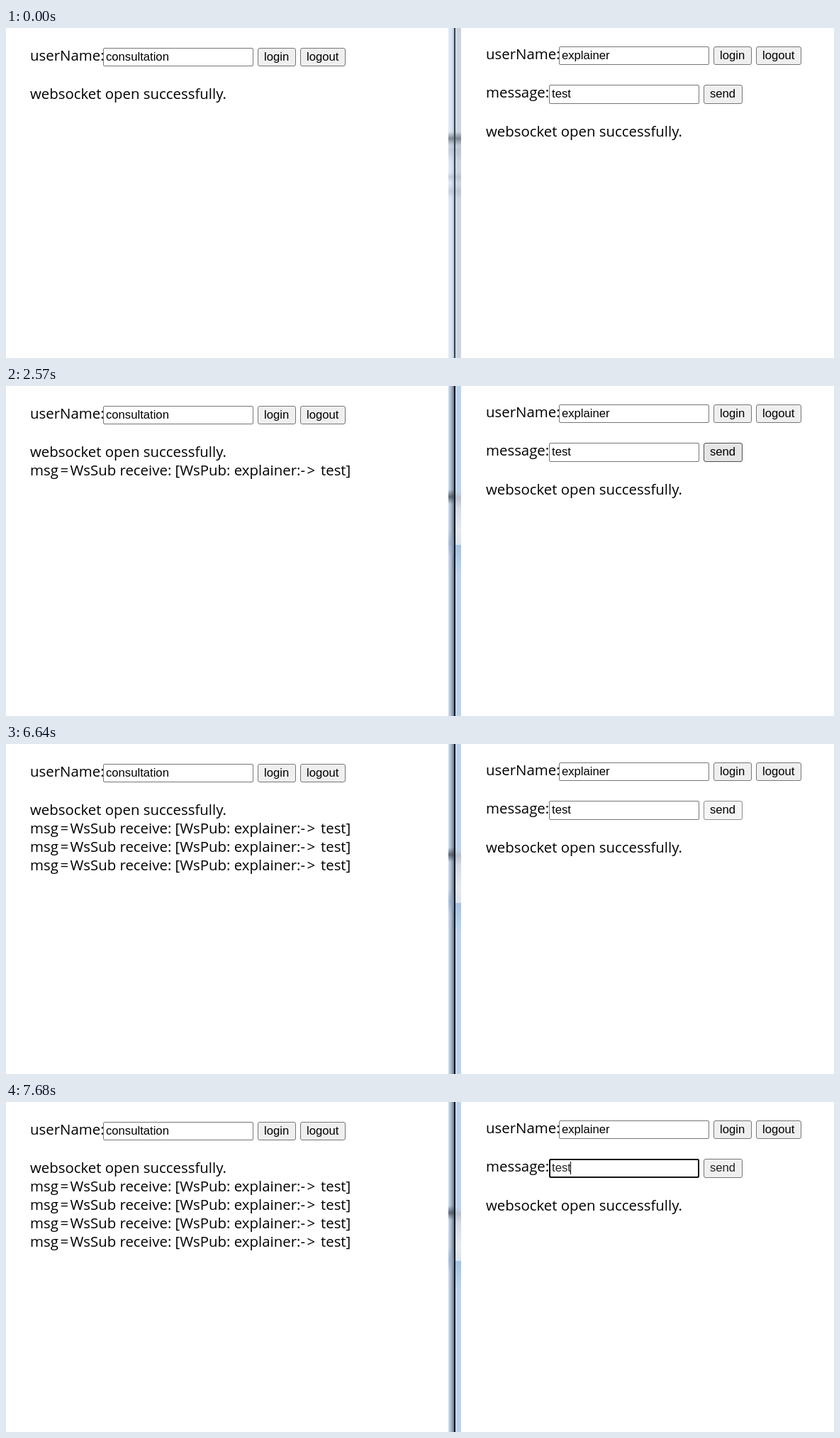
Recreate the animation shown at these times as an HTML page. Size 1168x465 px, loop 8 s.

```html
<!DOCTYPE html>
<html lang="en">
<head>
<meta charset="utf-8">
<title>Websocket demo</title>
<style>
  html, body { margin: 0; width: 100%; height: 100%; overflow: hidden; background: #fff; }
  svg { display: block; width: 1168px; height: 465px; }
  .label { font: 20.4px "Open Sans", "Noto Sans", sans-serif; white-space: pre; }
  .control { font: 16.67px "Liberation Sans", Arial, sans-serif; }
</style>
</head>
<body>
<svg id="stage" viewBox="0 0 1168 465" xmlns="http://www.w3.org/2000/svg"><defs id="defs"></defs></svg>
<script>
const LOOP = 8000;
const stage = document.getElementById('stage');
const defs = document.getElementById('defs');

const NORMAL = { fill: '#efefef', stroke: '#767676' };
const HOVER = { fill: '#e5e5e5', stroke: '#4f4f4f' };
const PRESSED = { fill: '#f5f5f5', stroke: '#8d8d8d' };
const HIDE = { opacity: 0 };
const SHOW = { opacity: 1 };

function add(tag, attrs, parent = stage) {
  const el = document.createElementNS('http://www.w3.org/2000/svg', tag);
  for (const key in attrs) el.setAttribute(key, attrs[key]);
  return parent.appendChild(el);
}

function text(cls, x, y, str, attrs = {}) {
  const el = add('text', { class: cls, x, y, ...attrs });
  el.textContent = str;
  return el;
}

const label = (x, y, str, attrs) => text('label', x, y, str, attrs);

function box(x, y, w, h, attrs) {
  return add('rect', { x: x + .5, y: y + .5, width: w - 1, height: h - 1, ...attrs });
}

function input(x, y, h, value) {
  box(x, y, 212, h, { rx: 1.5, fill: '#fff', stroke: '#767676' });
  return text('control', x + 4, y + 18, value);
}

function button(x, y, w, h, caption) {
  const face = box(x, y, w, h, { rx: 2.5, ...NORMAL });
  return { face, caption: text('control', x + 9, y + 18, caption) };
}

// Hard changes: each step is [time in ms, properties].
function play(el, steps) {
  const frames = steps.map(([time, props]) => ({ ...props, offset: time / LOOP, easing: 'step-end' }));
  frames.push({ ...steps[steps.length - 1][1], offset: 1 });
  el.animate(frames, { duration: LOOP, iterations: Infinity });
}

// Stops are [offset, colour, opacity].
function gradient(id, vertical, stops) {
  const g = add('linearGradient', { id, x1: 0, y1: 0, x2: vertical ? 0 : 1, y2: vertical ? 1 : 0 }, defs);
  for (const [offset, color, alpha = 1] of stops) {
    add('stop', { offset, 'stop-color': color, 'stop-opacity': alpha }, g);
  }
  return `url(#${id})`;
}

function strip(parent, x, y, width, height, fill) {
  add('rect', { x, y, width, height, fill }, parent);
}

function smudge(parent, id, x, y, width, height, color, alpha) {
  strip(parent, x, y, width, height,
    gradient(id, true, [[0, color, 0], [.5, color, alpha], [1, color, 0]]));
}

function divider() {
  const idle = add('g', {});
  strip(idle, 624, 0, 8, 465, gradient('idleL', false, [[0, '#e0eaf5'], [.6, '#d6e2f0'], [1, '#b9c6d6']]));
  strip(idle, 634, 0, 8, 465, gradient('idleR', false, [[0, '#d5dee9'], [.4, '#c6d2e0'], [1, '#cad5e3']]));
  smudge(idle, 'idleDark', 624, 146, 18, 20, '#5d6772', .75);
  smudge(idle, 'idleMid', 624, 155, 18, 34, '#aab3c2', .5);
  smudge(idle, 'idleLow', 624, 203, 18, 14, '#9eabbd', .4);
  smudge(idle, 'idleEnd', 624, 220, 18, 20, '#a5b3c6', .45);
  strip(idle, 632, 0, 2, 465, '#3c4147');

  const active = add('g', HIDE);
  strip(active, 624, 0, 8, 465, gradient('actL', false, [[0, '#d0dcea'], [.5, '#a9b9cd'], [1, '#66768b']]));
  strip(active, 634, 0, 8, 465, gradient('actR', false, [[0, '#d3e2f3'], [.3, '#b9d0ea'], [1, '#bed4ed']]));
  smudge(active, 'actDark', 624, 146, 8, 20, '#3c4656', .75);
  smudge(active, 'actLow', 624, 203, 8, 38, '#7f9dc0', .4);
  strip(active, 634, 148, 8, 76, gradient('actPale', true,
    [[0, '#c0c8d4', 0], [.12, '#b7c0ce'], [.3, '#d3dae5'], [.7, '#e2e8f1'], [1, '#d9e3ef']]));
  strip(active, 634, 224, 8, 40, gradient('actBlue', true, [[0, '#a3c1e3'], [1, '#a3c1e3', 0]]));
  strip(active, 632, 0, 2, 465, '#16191d');

  play(idle, [[0, SHOW], [890, HIDE]]);
  play(active, [[0, HIDE], [890, SHOW]]);
}

function userRow(x, y, name) {
  label(x, y + 18, 'userName:');
  input(x + 103, y, 26, name);
  button(x + 321, y, 54, 26, 'login');
  return button(x + 381, y, 64, 26, 'logout');
}

divider();

// Left window: receives
userRow(34, 28, 'consultation');
label(34, 100, 'websocket open successfully.');
const received = 'msg=WsSub receive: [WsPub: explainer:-> test]';
const isSign = c => c === '=' || c === '>';
const gaps = [...received].map((c, i) => isSign(c) || isSign(received[i - 1]) ? 2.5 : 0).join(' ');
[2570, 4450, 5570, 7040].forEach((time, i) => {
  const line = label(34, 126 + 26 * i, received, { dx: gaps, opacity: 0 });
  play(line, [[0, HIDE], [time, SHOW]]);
});

// Right window: sends
const logout = userRow(677, 26, 'explainer');
label(677, 98, 'message:');
const message = input(766, 80, 27, 'test');
const send = button(984, 80, 55, 27, 'send');
label(677, 153, 'websocket open successfully.');

const focus = add('g', HIDE);
add('rect', { x: 767, y: 81, width: 210, height: 25, rx: 2, fill: 'none', stroke: '#101010', 'stroke-width': 2 }, focus);
strip(focus, 796, 84, 1, 18, '#000');

play(logout.face, [[0, NORMAL], [200, HOVER], [410, NORMAL]]);
play(send.face, [
  [0, NORMAL], [610, HOVER], [1090, PRESSED], [1350, HOVER],
  [6640, PRESSED], [6840, HOVER], [7400, NORMAL]
]);
play(focus, [[0, HIDE], [7400, SHOW]]);
for (const el of [message, send.caption]) {
  play(el, [[0, { fill: '#000' }], [7680, { fill: '#222' }]]);
}
</script>
</body>
</html>
```
